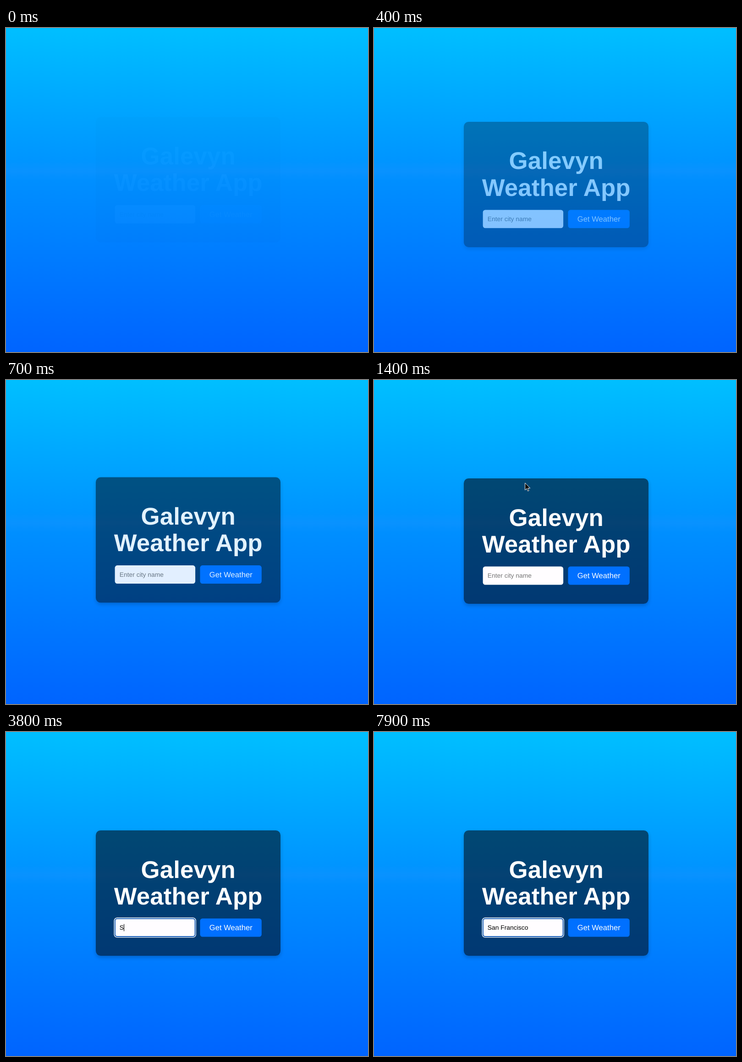
Write an HTML page that moves like this. It is 790x708 px and loops after 8 s.

```html
<!DOCTYPE html>
<html lang="en">
<head>
<meta charset="utf-8">
<title>Weather App</title>
<style>
  html, body { margin: 0; width: 100%; height: 100%; overflow: hidden; }
  body {
    position: relative;
    font-family: "Liberation Sans", Arial, sans-serif;
    background: linear-gradient(rgb(0,191,255), rgb(0,149,255) 41%,
      rgb(9,146,255) 44.2%, rgb(0,143,255) 47%, rgb(0,100,255));
  }
  .card {
    position: absolute; left: 196px; top: 215px; width: 403px; height: 274px;
    border-radius: 10.4px;
    background: rgba(3, 0, 0, .55);
    box-shadow: 0 4px 8px rgba(0, 0, 0, .2);
  }
  .content { display: block; width: 100%; height: 100%; }
  text { text-rendering: geometricPrecision; white-space: pre; }
  .title { font-size: 530px; font-weight: bold; text-anchor: middle; fill: #fff; }
  .label { font-size: 166.4px; text-anchor: middle; fill: #fff; }
  .hint, .typed { font-size: 138.7px; }
  .hint { fill: #757575; }
  .field { fill: #fffdff; }
  .button { fill: #0070ff; }
  .ring { fill: none; }
  .cursor {
    position: absolute; left: 0; top: 0;
    width: 24px; height: 28px; overflow: visible;
  }
</style>
</head>
<body>
<div class="card">
  <!-- units are tenths of a pixel, so text is laid out without rounded advances -->
  <svg class="content" viewBox="1960 2150 4030 2740">
    <text class="title" x="3977" y="3185">Galevyn</text>
    <text class="title" x="3977" y="3768">Weather App</text>
    <rect class="field" x="2376" y="4075" width="1755" height="399" rx="52"/>
    <g class="ring">
      <rect x="2363" y="4062" width="1779" height="424" rx="62" stroke="#fff" stroke-width="15"/>
      <rect x="2379" y="4078" width="1747" height="392" rx="50" stroke="#0a55b5" stroke-width="18"/>
    </g>
    <text class="hint" x="2477" y="4322">Enter city name</text>
    <text class="typed" x="2477" y="4322" xml:space="preserve"></text>
    <rect class="caret" y="4197" width="11" height="156"/>
    <rect class="button" x="4235" y="4075" width="1343" height="399" rx="52"/>
    <text class="label" x="4907" y="4332">Get Weather</text>
  </svg>
</div>
<svg class="cursor">
  <path class="arrow" d="M0 0V15.5L3.6 12.2L6 17.8L8.4 16.8L6 11.4H11Z" fill="#000" stroke="#fff" stroke-width="1"/>
  <g class="beam" fill="none">
    <path d="M-4 -8Q0 -8 0 -5.5Q0 -8 4 -8M0 -6V6M-4 8Q0 8 0 5.5Q0 8 4 8M-2 1H2" stroke="#fff" stroke-width="2.6"/>
    <path d="M-4 -8Q0 -8 0 -5.5Q0 -8 4 -8M0 -6V6M-4 8Q0 8 0 5.5Q0 8 4 8M-2 1H2" stroke="#000" stroke-width="1.3"/>
  </g>
</svg>
<script>
const LOOP = 8000, STEP = 100;
const FOCUS = 2500;
const TEXT_X = 2477;
const POINTER = { show: 1000, arrive: 2300, from: [338, 166], to: [301, 427] };
const KEYS = [
  [3800, "S"], [4100, "an"], [4400, " "], [4600, "F"], [4800, "r"], [4900, "a"],
  [5000, "n"], [5700, "c"], [6200, "is"], [6400, "c"], [7100, "o"]
];

const $ = s => document.querySelector(s);
const card = $(".card"), ring = $(".ring"), hint = $(".hint"), typed = $(".typed");
const caret = $(".caret"), cursor = $(".cursor"), arrow = $(".arrow"), beam = $(".beam");

const clamp = x => Math.min(1, Math.max(0, x));
const bezier = (a, b, s) => 3 * a * s * (1 - s) ** 2 + 3 * b * s * s * (1 - s) + s ** 3;
const show = (el, on) => { el.style.display = on ? "" : "none"; };

// CSS "ease": cubic-bezier(.25, .1, .25, 1)
function ease(x) {
  let lo = 0, hi = 1;
  for (let i = 0; i < 24; i++) {
    const mid = (lo + hi) / 2;
    if (bezier(.25, .25, mid) < x) lo = mid; else hi = mid;
  }
  return bezier(.1, 1, hi);
}

function drawCard(t) {
  const p = t < STEP ? .02 : t >= 1100 ? 1 : ease(clamp((t - 100) / 1000));
  card.style.opacity = p;
  card.style.transform = p < 1 ? `translateY(${-20.8 * (1 - p)}px)` : "none";
}

// The caret restarts its blink at each key
function caretAlpha(t, last) {
  if (t < FOCUS) return 0;
  const age = t - last;
  if (age >= 1000 && age < 1000 + STEP) return .5;
  return age % 1000 < 500 ? 1 : 0;
}

function drawField(t) {
  const pressed = KEYS.filter(([at]) => at <= t);
  const last = pressed.length ? pressed[pressed.length - 1][0] : FOCUS;
  typed.textContent = pressed.map(k => k[1]).join("");
  show(hint, !pressed.length);
  show(ring, t >= FOCUS);
  caret.setAttribute("x", TEXT_X + typed.getComputedTextLength());
  caret.style.opacity = caretAlpha(t, last);
}

function drawCursor(t) {
  const { show: start, arrive, from, to } = POINTER;
  const u = clamp((t - start) / (arrive - start));
  const p = u * u * (3 - 2 * u);
  const [x, y] = from.map((v, i) => v + (to[i] - v) * p);
  const overText = (y > 271 && y < 388) || y > 407;
  show(cursor, t >= start && t < KEYS[0][0]);
  show(arrow, !overText);
  show(beam, overText);
  cursor.style.transform = `translate(${x}px, ${y}px)`;
}

function frame(now) {
  const t = Math.floor((now % LOOP) / STEP) * STEP;
  drawCard(t);
  drawField(t);
  drawCursor(t);
}

const origin = performance.now();
(function tick() {
  frame(performance.now() - origin);
  requestAnimationFrame(tick);
})();
</script>
</body>
</html>
```
